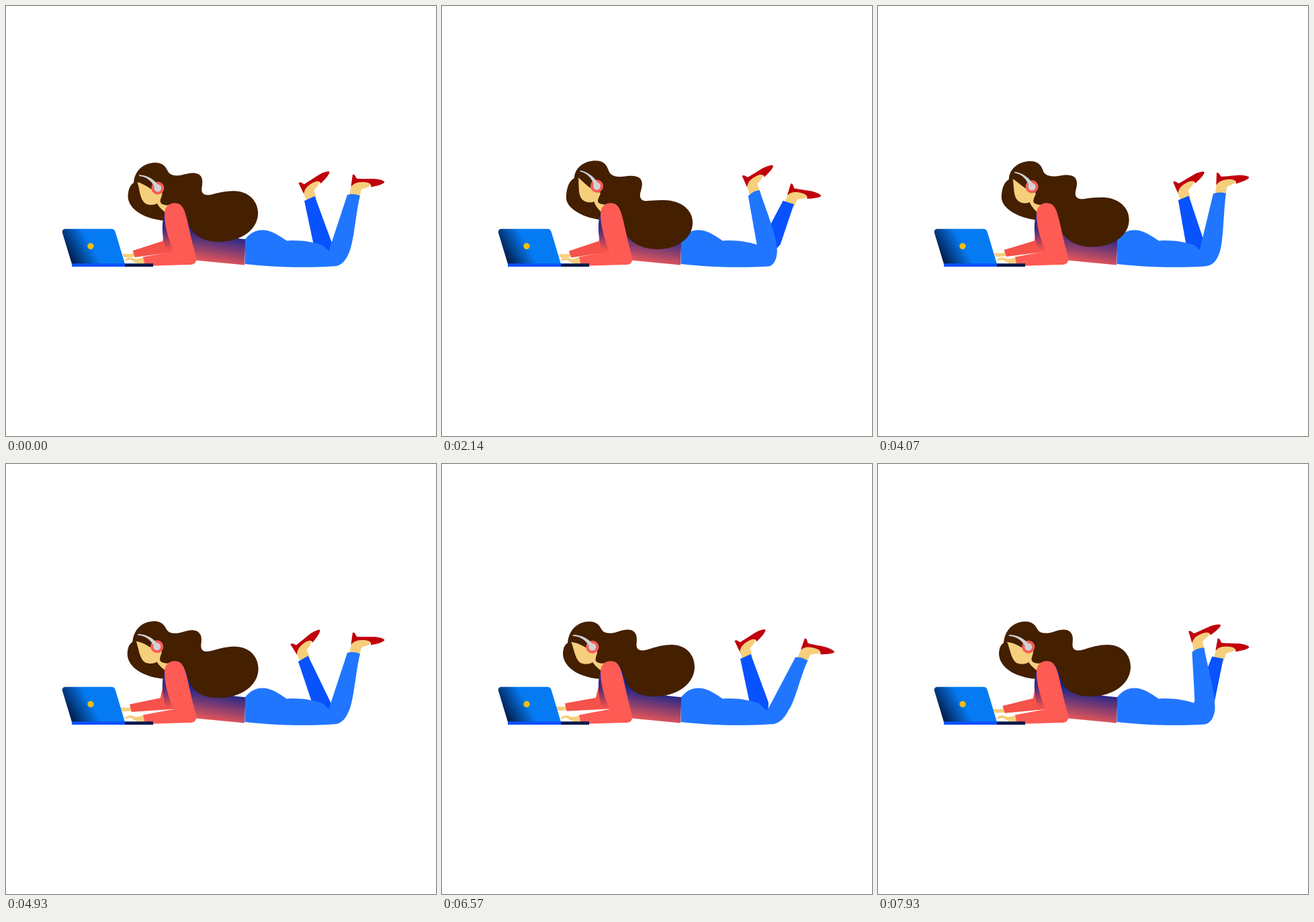
Recreate the animation shown at these times as an HTML page. Size 640 by 640 pixels, loop 8000 ms.

```html
<!DOCTYPE html>
<html lang="en">
<head>
<meta charset="utf-8">
<title>Lying with a laptop</title>
<style>
  html, body { margin: 0; width: 100%; height: 100%; overflow: hidden; background: #fff; }
  svg { display: block; width: 100vw; height: 100vh; }
  .skin { fill: #f5cf7c; }
  .hair { fill: #441f00; }
  .sleeve { fill: #fd5b53; }
  .jeans { fill: #2176ff; }
  .shoe { fill: #c0000c; }
  .silver { fill: #d0d2d5; }
</style>
</head>
<body>
<svg viewBox="0 0 640 640">
  <defs>
    <linearGradient id="vest" gradientUnits="userSpaceOnUse" x1="304" y1="335" x2="296" y2="384">
      <stop offset="0" stop-color="#14248c"/><stop offset="1" stop-color="#f95a54"/>
    </linearGradient>
    <linearGradient id="chest" gradientUnits="userSpaceOnUse" x1="234" y1="312" x2="241" y2="363">
      <stop offset="0" stop-color="#2b2384"/><stop offset=".4" stop-color="#4a2a7c"/><stop offset="1" stop-color="#f4524a"/>
    </linearGradient>
    <linearGradient id="lid" gradientUnits="userSpaceOnUse" x1="93" y1="371" x2="125" y2="353">
      <stop offset="0" stop-color="#021d4c"/><stop offset="1" stop-color="#057bf3"/>
    </linearGradient>
    <g id="foot">
      <path class="skin" d="M510 285L514 268C517 261 531 259 543.5 264C543 270 536 270 529 273L526 285Z"/>
      <path class="shoe" d="M516 250.500L519 251.500L522 257C533 257.500 541 257 549 257.300C556 258 563 260 563.300 262C563 264.500 553 268 543 269.500C545 264 538 262 530 262C521 262 517 265 513.500 269Z"/>
    </g>
  </defs>

  <g id="backFoot"><use href="#foot" transform="translate(481 247) rotate(-33) translate(-563 -262)"/></g>
  <path id="backShin" fill="#0852ff"/>

  <path id="backHand" class="skin"/>
  <path id="backSleeve" fill="#f5524a"/>
  <path id="lock" class="hair"/>
  <path fill="url(#vest)" d="M255 293L272 300C290 335 320 345 356.500 347L355 385.500L282 378.500L250 374Z"/>
  <path fill="url(#chest)" d="M237 305C231 320 231 344 239 363L250 364L246 300Z"/>
  <path class="jeans" d="M356 347C364 337 373 333 383 333.500C396 334 408 343 418 349.500C438 348 456 351 471 356L484 368L488 387.300C440 390.500 395 388.500 355.500 384Z"/>
  <path id="neck" class="skin"/>
  <path id="face" class="skin"/>
  <path id="mane" class="hair"/>
  <g id="headphones">
    <circle r="9.600" fill="#f55c55"/>
    <circle r="5.500" class="silver"/>
    <path class="silver" d="M-29 -18C-17 -18.500 -4 -12 3 -1L-4 0C-9 -9 -17 -16 -29 -16.300Z"/>
  </g>

  <g id="frontFoot"><use href="#foot"/></g>
  <path id="frontShin" class="jeans"/>

  <path class="skin" d="M208 373.500C200 374.500 196 378 190 375.500C185 373 179 374.500 176.500 378.500C180 380.500 184 376 188 379C192 383 198 384 208 384Z"/>
  <path class="sleeve" d="M236 310C236 298 243 293.500 251 293.300C259 293.300 263 298 266 306C271 320 275 346 282 370C285 380 282 384.500 275 385L207 387L204 373.500L249.500 365C244 353 236 330 236 310Z"/>

  <path fill="url(#lid)" d="M89 331.700H157Q161 331.700 162.500 335.500L177 384H98L84.500 339.500C82.500 334 85 331.700 89 331.700Z"/>
  <circle cx="126" cy="357.500" r="4.700" fill="#efbf12"/>
  <path fill="#0a52ff" d="M98 383.300H177V388H98Z"/>
  <path fill="#05184a" d="M177 383.300H219V388H177Z"/>
</svg>
<script>
  const LOOP = 8000;
  const FRONT_KNEE = [485, 374], BACK_KNEE = [476, 373];
  const FRONT_REST = 34.9, BACK_REST = 2.3;

  // [time, value] steps, eased in and out between neighbours
  const tracks = {
    front: [[400, 34.9], [2000, 3.2], [2600, 3.2], [4600, 34.9], [5050, 34.9], [6400, 46.4], [6782, 46.4], [8335, 3.2]],
    back: [[400, 2.3], [2000, 44.2], [2600, 44.2], [4600, -4.1], [5050, -4.1], [6400, 2.3], [6782, 2.3], [8335, 44.2]],
    head: [[-1450, 0], [2550, 1], [3480, 1], [5350, 0]],
    arm: [[0, .85], [700, .75], [3100, 1], [3500, 1], [5000, .13], [6300, -.06], [8600, .5]]
  };

  // Each shape at both ends of its movement
  const morphs = {
    lock: ['head',
      'M191 265C183 266 180 274 180 283C181 304 206 318 236 320L246 308L225 278Z',
      'M203 254C190 256 185 270 185 286C186 302 211 315 236 318L246 306L230 274Z'],
    neck: ['head',
      'M223 293C227 300 232 304 239 309L247 296L231 280Z',
      'M226 290C228 297 232 302 238 308L247 296L236 280Z'],
    face: ['head',
      'M192 264C197 277 198 290 206 296C213 299 221 298 226 294L234 290L232 274L210 264Z',
      'M203 254C205 267 201 284 212 290C218 293 224 293 229 289L237 285L237 272L220 258Z'],
    mane: ['head',
      'M187 267C188 247 202 234.5 219 234.5C232 234.5 235 242 238 247C242 253 252 253 262 249.5C272 246 280 245 285 249C291 254 290 261 289.500 268C289 277 295 279 305 276.5C318 272 330 269 342 269C363 269 376 284 376 302C376 327 350 346 316 346C293 346 278 337 272 320C268 306 264 294 252 294C245 297 236 298 231 295C225 291 232 284 231 278L221 277C212 273 205 266 192 265Z',
      'M197 256C198 240 212 230 229 230C242 230 246 238 248 244C250 253 260 255 270 254C280 252.5 288 252 294 256C300 261 298 269 296 276C293 285 296 291 306 290.5C316 289.500 324 289.500 331 289.500C356 290 373 304 373 323C373 346 350 362.5 320 362.5C295 362.5 276 350 270 333C268 315 266 300 252 296C247 296 240 296 235 294C228 290 236 283 236 278L225 273C217 269 212 263 203 255Z'],
    backHand: ['arm',
      'M185 360.5C180 362.5 175 361 170.500 361C168 362 171 367 175 367.5L187 366.5Z',
      'M193 368.5C187 371 181 370 175.500 370C173 371 176 375.5 180 375.5L194 374Z'],
    backSleeve: ['arm',
      'M183 356.5L229 348L234 328L250 364.5L186 368Z',
      'M189.500 365.5L234 350L236 328L250 366L193 375Z']
  };

  const byId = id => document.getElementById(id);
  const mix = (a, b, k) => a + (b - a) * k;

  function valueAt(steps, t) {
    if (t <= steps[0][0]) return steps[0][1];
    for (let i = 1; i < steps.length; i++) {
      const [t0, a] = steps[i - 1], [t1, b] = steps[i];
      if (t < t1) {
        const u = (t - t0) / (t1 - t0);
        return mix(a, b, u * u * (3 - 2 * u));
      }
    }
    return steps[steps.length - 1][1];
  }

  function mixPath(from, to, k) {
    const goal = to.match(/-?[\d.]+/g);
    let i = 0;
    return from.replace(/-?[\d.]+/g, n => mix(+n, +goal[i++], k).toFixed(2));
  }

  function turner([cx, cy], degrees) {
    const a = degrees * Math.PI / 180, c = Math.cos(a), s = Math.sin(a);
    return (x, y) => [cx + (x - cx) * c - (y - cy) * s, cy + (x - cx) * s + (y - cy) * c];
  }

  function drawFrontLeg(angle) {
    const turn = angle - FRONT_REST;
    const p = turner(FRONT_KNEE, turn);
    const k = 1 + turn / 26;
    const knee = [mix(501, 511, k), mix(364, 366, k)];
    byId('frontShin').setAttribute('d',
      `M${p(508, 281)}Q${p(518, 278.5)} ${p(527, 282.5)}` +
      `C${p(521, 305)} ${[mix(501, 518, k), mix(340, 350, k)]} ${knee}` +
      `C${[mix(500, 506, k), mix(377, 379, k)]} ${[mix(495, 499, k), mix(385, 387, k)]} 488,387.3` +
      `L478,375L${[mix(471, 482, k), mix(356, 360, k)]}Z`);
    byId('frontFoot').setAttribute('transform', `rotate(${turn} ${FRONT_KNEE})`);
  }

  function drawBackLeg(angle) {
    const turn = angle - BACK_REST;
    const p = turner(BACK_KNEE, turn);
    byId('backShin').setAttribute('d',
      `M${p(444, 290)}L${p(459.5, 283)}L${485 + .42 * angle},355L485,375L465,375` +
      `L${457.2 + .35 * angle},356Z`);
    byId('backFoot').setAttribute('transform', `rotate(${turn} ${BACK_KNEE})`);
  }

  function draw(t) {
    const pose = {};
    for (const name in tracks) pose[name] = valueAt(tracks[name], t);
    for (const id in morphs) {
      const [track, from, to] = morphs[id];
      byId(id).setAttribute('d', mixPath(from, to, pose[track]));
    }
    const h = pose.head;
    byId('headphones').setAttribute('transform',
      `translate(${mix(223.8, 230.7, h)} ${mix(272.3, 268, h)}) rotate(${12 * h})`);
    drawBackLeg(pose.back);
    drawFrontLeg(pose.front);
  }

  function tick() {
    draw(performance.now() % LOOP);
    requestAnimationFrame(tick);
  }
  tick();
</script>
</body>
</html>
```
